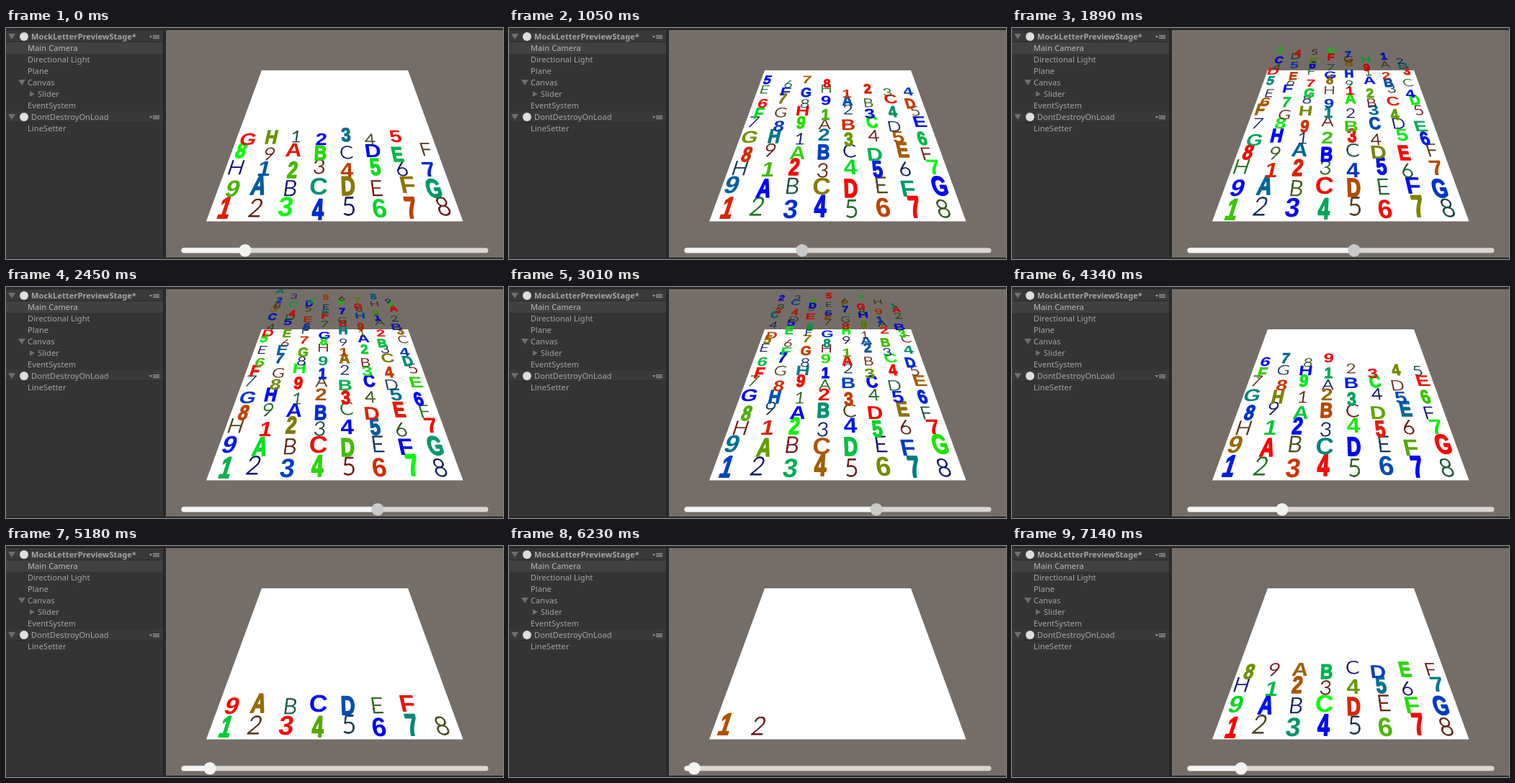
An HTML page with a canvas for the animation above (7.21 s loop, 690 by 322 pixels).

```html
<!DOCTYPE html>
<html lang="en">
<head>
<meta charset="utf-8">
<title>Letters on a plane</title>
<style>
  html, body { margin: 0; width: 690px; height: 322px; overflow: hidden; background: #282828; }
  #scene { position: absolute; left: 0; top: 0; }
  #tree {
    position: absolute; left: 0; top: 3px; width: 218px; height: 317px; background: #343434;
    font: 11px/16px "Noto Sans", "Open Sans", sans-serif; letter-spacing: .1px; color: #a6a6a6;
  }
  .row { position: absolute; left: 0; width: 218px; height: 16px; white-space: pre; }
  .row span { position: absolute; top: 0; }
  .head { background: #393939; box-shadow: inset 0 -1px #2c2c2c; }
  .head.open { font-weight: bold; }
  .picked { background: #414141; color: #bdbdbd; }
  .dot { position: absolute; left: 19px; top: 2px; width: 12px; height: 12px; border-radius: 50%; background: #dedede; }
  .tri { position: absolute; top: 4px; border: 5px solid transparent; border-bottom-width: 0; border-top: 8px solid #6e6e6e; }
  .tri.shut { border: 4px solid transparent; border-right-width: 0; border-left: 7px solid #6e6e6e; }
  .menu { position: absolute; left: 204px; top: 6px; width: 9px; height: 1px; background: #a0a0a0; box-shadow: 0 2px #a0a0a0, 0 4px #a0a0a0; }
  .menu::before { content: ""; position: absolute; left: -5px; top: 1px; border: 2px solid transparent; border-top: 3px solid #a0a0a0; border-bottom: 0; }
</style>
</head>
<body>
<canvas id="scene" width="690" height="322"></canvas>
<div id="tree"></div>
<script>
const LOOP = 7210, STEP = 70;
const CHARS = "123456789ABCDEFGH";
const COLS = 8;
const VIEW = { x: 222, y: 3, w: 468, h: 317 };
const MID_X = 456;
const HORIZON = -223;
const NADIR = 358;       // where vertical lines meet
const NEAR = 43.1;       // column spacing of the front row
const TRACK = { x: 243.5, y: 306.5, w: 426, h: 7 };

// time (ms), slider handle x, wave phase (rad)
const KEYS = [
  [0, 332, -.45], [1050, 407, .54], [1890, 475, 1.35], [2450, 516, 1.87],
  [2680, 523, 2.08], [3010, 510, 2.39], [4340, 375, 3.64], [5180, 283, 4.51],
  [5600, 264, 4.88], [6090, 252.4, 5.33], [6160, 252.4, 5.4], [7140, 318, 6.29], [7210, 323, 6.36]
];

// three typefaces take turns: heavy condensed, thin with dark rim, plain bold
const FACES = [
  { font: 'bold 42px "Liberation Sans", Arial, sans-serif', cap: 30, wide: .7, light: 1, rim: 2 },
  { font: '300 35px Lato, sans-serif', cap: 25.4, wide: .96, light: .6, rim: .8, rimColor: "#101010" },
  { font: 'bold 37.5px "Liberation Sans", Arial, sans-serif', cap: 27, wide: 1, light: 1 }
];

const TREE = [
  { text: "MockLetterPreviewStage*", x: 35, y: 1, cls: "head open", tri: 3 },
  { text: "Main Camera", x: 30, y: 17, cls: "picked" },
  { text: "Directional Light", x: 30, y: 33 },
  { text: "Plane", x: 30, y: 49 },
  { text: "Canvas", x: 30, y: 65, tri: 17 },
  { text: "Slider", x: 44, y: 81, tri: 33, shut: true },
  { text: "EventSystem", x: 30, y: 97 },
  { text: "DontDestroyOnLoad", x: 35, y: 113, cls: "head", tri: 3 },
  { text: "LineSetter", x: 30, y: 129 }
];

function add(parent, tag, cls) {
  const el = document.createElement(tag);
  el.className = cls;
  return parent.appendChild(el);
}

function buildTree() {
  const tree = document.getElementById("tree");
  for (const item of TREE) {
    const cls = item.cls || "";
    const row = add(tree, "div", "row " + cls);
    row.style.top = item.y + "px";
    const label = add(row, "span", "");
    label.textContent = item.text;
    label.style.left = item.x + "px";
    if (item.tri) add(row, "i", item.shut ? "tri shut" : "tri").style.left = item.tri + "px";
    if (cls.startsWith("head")) {
      add(row, "i", "dot");
      add(row, "i", "menu");
    }
  }
}

const ctx = document.getElementById("scene").getContext("2d");

function sample(t) {
  const n = KEYS.findIndex(k => k[0] > t);
  const a = KEYS[n - 1], b = KEYS[n];
  const u = (t - a[0]) / (b[0] - a[0]);
  return { handle: a[1] + (b[1] - a[1]) * u, phase: a[2] + (b[2] - a[2]) * u };
}

// red to green to blue for v from 0 to 2
function tint(v, light) {
  const rgb = [Math.max(0, 1 - v), 1 - Math.abs(v - 1), Math.max(0, v - 1)];
  return `rgb(${rgb.map(c => Math.round(c * 255 * light)).join()})`;
}

function drawGlyph(i, phase) {
  const face = FACES[i % 3];
  const row = Math.floor(i / COLS), col = i % COLS;
  const gap = 1 / (1 / NEAR + .001513 * row);
  let x = MID_X + (col - 3.54) * gap;
  let y = HORIZON + 10.97 * gap;
  const light = face.light * (y < 58 ? .8 : 1);

  // each letter bobs in height above the plane
  const bob = .019 * gap / 40.5 * Math.cos(10 * (i + phase) - .5);
  x += (MID_X - x) * bob;
  y += (NADIR - y) * bob;

  const size = gap / NEAR * (1 - bob);
  const tall = size * gap / NEAR;
  const lean = (x - MID_X) / (y - HORIZON);
  const color = tint(1 - Math.cos(i + phase), light);
  const char = CHARS[i % CHARS.length];

  ctx.setTransform(size * face.wide, 0, tall * lean, tall, x, y);
  ctx.font = face.font;
  if (face.rim) {
    ctx.strokeStyle = face.rimColor || color;
    ctx.lineWidth = face.rim;
    ctx.strokeText(char, 0, face.cap / 2);
  }
  ctx.fillStyle = color;
  ctx.fillText(char, 0, face.cap / 2);
}

function drawPlane() {
  ctx.fillStyle = "#fff";
  ctx.beginPath();
  ctx.moveTo(355, 59);
  ctx.lineTo(558, 59);
  ctx.lineTo(634.5, 269.5);
  ctx.lineTo(278, 269.5);
  ctx.fill();
}

function bar(x, w, color) {
  ctx.fillStyle = color;
  ctx.beginPath();
  ctx.roundRect(x, TRACK.y, w, TRACK.h, 3.5);
  ctx.fill();
}

function drawSlider(x) {
  bar(TRACK.x, TRACK.w, "#d9d6d3");
  bar(TRACK.x, x - TRACK.x, "#f6f5f4");
  ctx.fillStyle = x > 390 ? "#c9c9c9" : "#f2f2f1";
  ctx.beginPath();
  ctx.arc(x, 310, 8.7, 0, Math.PI * 2);
  ctx.fill();
}

function draw(t) {
  const { handle, phase } = sample(t);
  const count = Math.round((handle - 252.4) / 2.04);

  ctx.setTransform(1, 0, 0, 1, 0, 0);
  ctx.fillStyle = "#282828";
  ctx.fillRect(0, 0, 690, 322);
  ctx.save();
  ctx.beginPath();
  ctx.rect(VIEW.x, VIEW.y, VIEW.w, VIEW.h);
  ctx.clip();
  ctx.fillStyle = "#756e68";
  ctx.fillRect(VIEW.x, VIEW.y, VIEW.w, VIEW.h);
  drawPlane();
  ctx.textAlign = "center";
  ctx.lineJoin = "round";
  for (let i = 0; i < count; i++) drawGlyph(i, phase);
  ctx.setTransform(1, 0, 0, 1, 0, 0);
  drawSlider(handle);
  ctx.restore();
}

buildTree();
const start = performance.now();
function tick() {
  const t = Math.max(0, performance.now() - start) % LOOP;
  draw(Math.floor(t / STEP) * STEP);
  requestAnimationFrame(tick);
}
tick();
</script>
</body>
</html>
```
